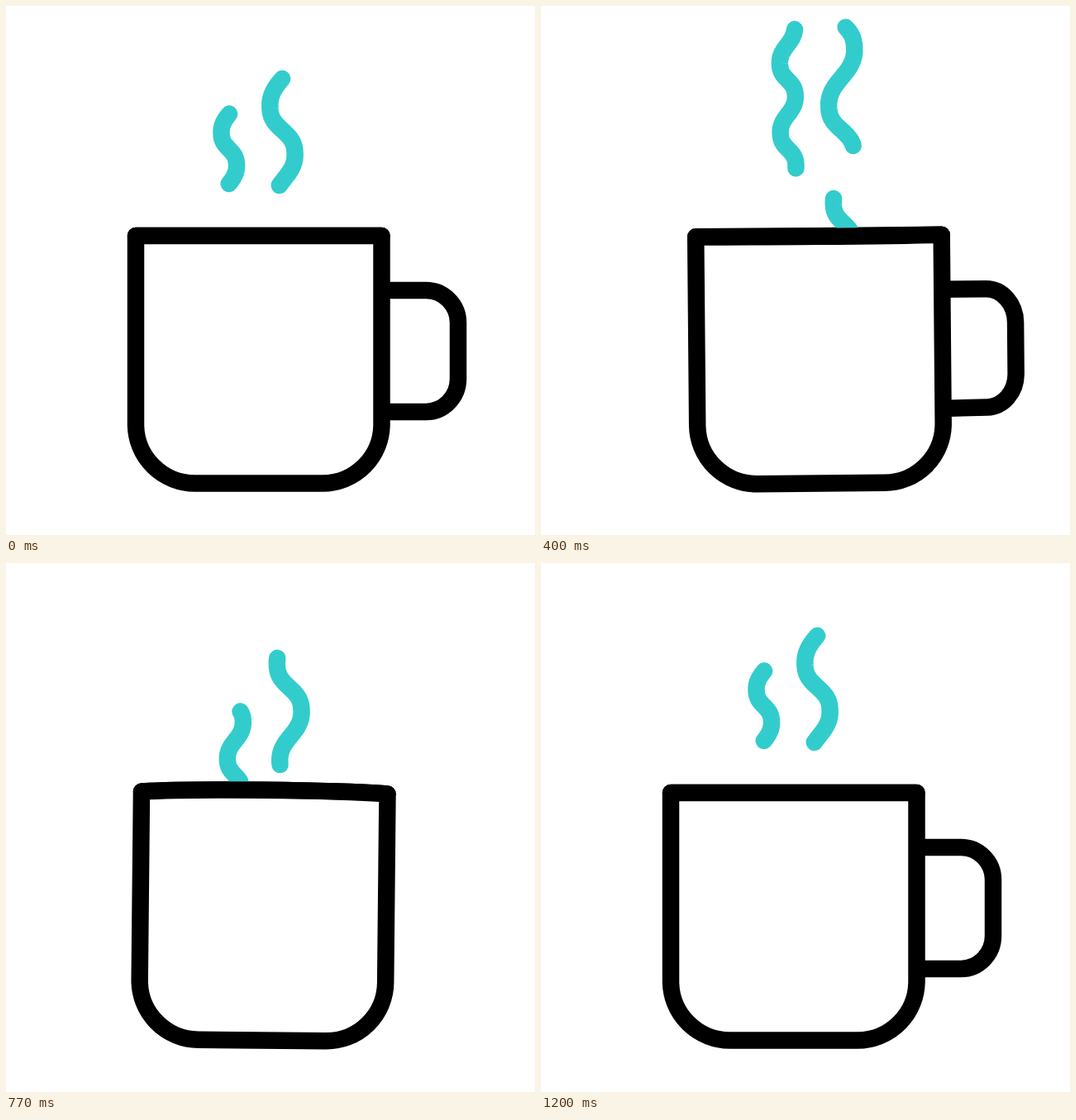
Animation of 640 by 640 pixels, one loop 1670 ms. Source, as an HTML page:

```html
<!DOCTYPE html>
<html lang="en">
<head>
<meta charset="utf-8">
<title>Spinning mug</title>
<style>
  html, body { margin: 0; width: 100%; height: 100%; overflow: hidden; background: #fff; }
  svg { display: block; width: 100vw; height: 100vh; }
  path { fill: none; stroke: #000; stroke-width: 20.5; stroke-linecap: round; stroke-linejoin: round; }
  #body { fill: #fff; }
  .steam path { stroke: #3cc; }
</style>
</head>
<body>
<svg viewBox="0 0 640 640">
  <g id="mug">
    <path id="handleBack"/>
    <path id="rim"/>
    <g class="steam">
      <path id="leftOld"/><path id="leftNew"/>
      <path id="rightOld"/><path id="rightNew"/>
    </g>
    <path id="body"/>
    <path id="handleFront"/>
  </g>
</svg>
<script>
const LOOP = 1670, STEP = 100 / 3, END = 36, CX = 306, BASE = 578, TAU = 2 * Math.PI;
const setPath = (id, d) => document.getElementById(id).setAttribute('d', d);

// Key poses: wind up, swing past the viewer, settle. Times count steps of 1/30 s.
const TIMES = [0, 5, 9, 16, 20, 27, END];
const shift = track(0, -6, 17.3, 45, 14, -2.5, 0);
const tilt = track(0, -2, -2.08, 1.93, 1.13, .1, 0);
const bulge = track(0, -9.5, -7.5, 11.5, -1, -4.5, 0);
const spin = track(0, -.55, -.59, 1.08, 3.47, 5.78, TAU);
const rise = track(230, 212, 176, 100, 48, 10, 0);

// The rim opens for a moment while the mug leans towards the viewer
const opening = f => 32 * Math.exp(-(((f - 16) / 2) ** 2));

// Smooth curve through the key poses, without overshoot
function track(...v) {
  const slope = i => (v[i + 1] - v[i]) / (TIMES[i + 1] - TIMES[i]);
  const tangent = i => {
    if (i === 0 || i === v.length - 1) return 0;
    const a = slope(i - 1), b = slope(i);
    return a * b <= 0 ? 0 : 2 * a * b / (a + b);
  };
  return f => {
    const i = Math.max(0, TIMES.findIndex(t => t >= f) - 1);
    const h = TIMES[i + 1] - TIMES[i], u = (f - TIMES[i]) / h, w = 1 - u;
    return v[i] * (1 + 2 * u) * w * w + v[i + 1] * u * u * (3 - 2 * u)
      + h * u * w * (tangent(i) * w - tangent(i + 1) * u);
  };
}

// Turning point i of each steam line; even ones lie to the right
const side = i => i % 2 ? -1 : 1;
const steam = {
  left: {
    turn: i => [269.75 + side(i) * 9.25, 26 + 42 * i],
    top: 28, head: 130.5, tail: 215,
    leave: f => [.01 * f ** 4, .000914 * f ** 4],
    enter: f => .081 * (END - f) ** 2.5
  },
  right: {
    turn: i => [334 + .8 * i + side(i) * (17 - 1.5 * i), 54 + 68 * i - 2.3 * i * i],
    top: 26, head: 88, tail: 217,
    leave: f => [1.1 * f ** 2, .0276 * f ** 3],
    enter: rise
  }
};

function waveX(turn, y) {
  let i = -1;
  while (turn(i + 1)[1] < y) i++;
  const [x0, y0] = turn(i), [x1, y1] = turn(i + 1);
  const p = x1 > x0 ? 2.2 : 1.75, u = (y - y0) / (y1 - y0);
  const a = u ** p, b = (1 - u) ** p;
  return x0 + (x1 - x0) * a / (a + b);
}

function strandPath({ turn, top }, head, tail) {
  head = Math.max(head, top);
  tail = Math.min(tail, 300);
  if (tail - head < .5) return '';
  const n = Math.ceil((tail - head) / 2), pts = [];
  for (let i = 0; i <= n; i++) {
    const y = head + (tail - head) * i / n;
    pts.push(waveX(turn, y).toFixed(2) + ',' + y.toFixed(2));
  }
  return 'M' + pts.join('L');
}

function rimCurve(b) {
  const y = 278 + b * 4 / 3;
  return `M157,278C225,${y} 386.5,${y} 454.5,278`;
}

function handlePath(angle) {
  const c = Math.cos(angle), s = Math.sin(angle), depth = s > 0 ? .22 : .1;
  const x = r => CX + r * c, low = r => 491 + depth * r * s;
  const inner = 148.5, outer = 241, bend = 194 + 8 * c - 18 * s;
  const ctrl = bend + .55 * (outer - bend);
  const y1 = 383 + 5 * Math.min(1, Math.abs(s) * 2), y2 = low(bend) - 40;
  return `M${x(inner)},344L${x(bend)},344`
    + `C${x(ctrl)},344 ${x(outer)},${y1 - .55 * (y1 - 344)} ${x(outer)},${y1}`
    + `L${x(outer)},${y2}`
    + `C${x(outer)},${y2 + .55 * (low(outer) - y2)} ${x(ctrl)},${low(ctrl)} ${x(bend)},${low(bend)}`
    + `L${x(inner)},${low(inner)}`;
}

function draw(f) {
  document.getElementById('mug').setAttribute('transform',
    `translate(${shift(f)} 0) rotate(${tilt(f)} ${CX} ${BASE})`);
  const angle = spin(f), inFront = angle > 0 && angle < Math.PI;
  setPath('handleFront', inFront ? handlePath(angle) : '');
  setPath('handleBack', inFront ? '' : handlePath(angle));
  setPath('rim', rimCurve(bulge(f) - opening(f)));
  setPath('body', rimCurve(bulge(f)) + 'V506A71.5,71.5 0 0 1 383,577.5H228.5A71.5,71.5 0 0 1 157,506Z');
  for (const [name, line] of Object.entries(steam)) {
    const [headUp, tailUp] = line.leave(f), below = line.enter(f);
    setPath(name + 'Old', strandPath(line, line.head - headUp, line.tail - tailUp));
    setPath(name + 'New', strandPath(line, line.head + below, line.tail + below));
  }
}

// Poses change thirty times a second, then rest until the loop ends
const start = performance.now();
function tick() {
  const t = (performance.now() - start) % LOOP;
  draw(Math.min(END, Math.floor((t + 3.4) / STEP)));
  requestAnimationFrame(tick);
}
tick();
</script>
</body>
</html>
```
